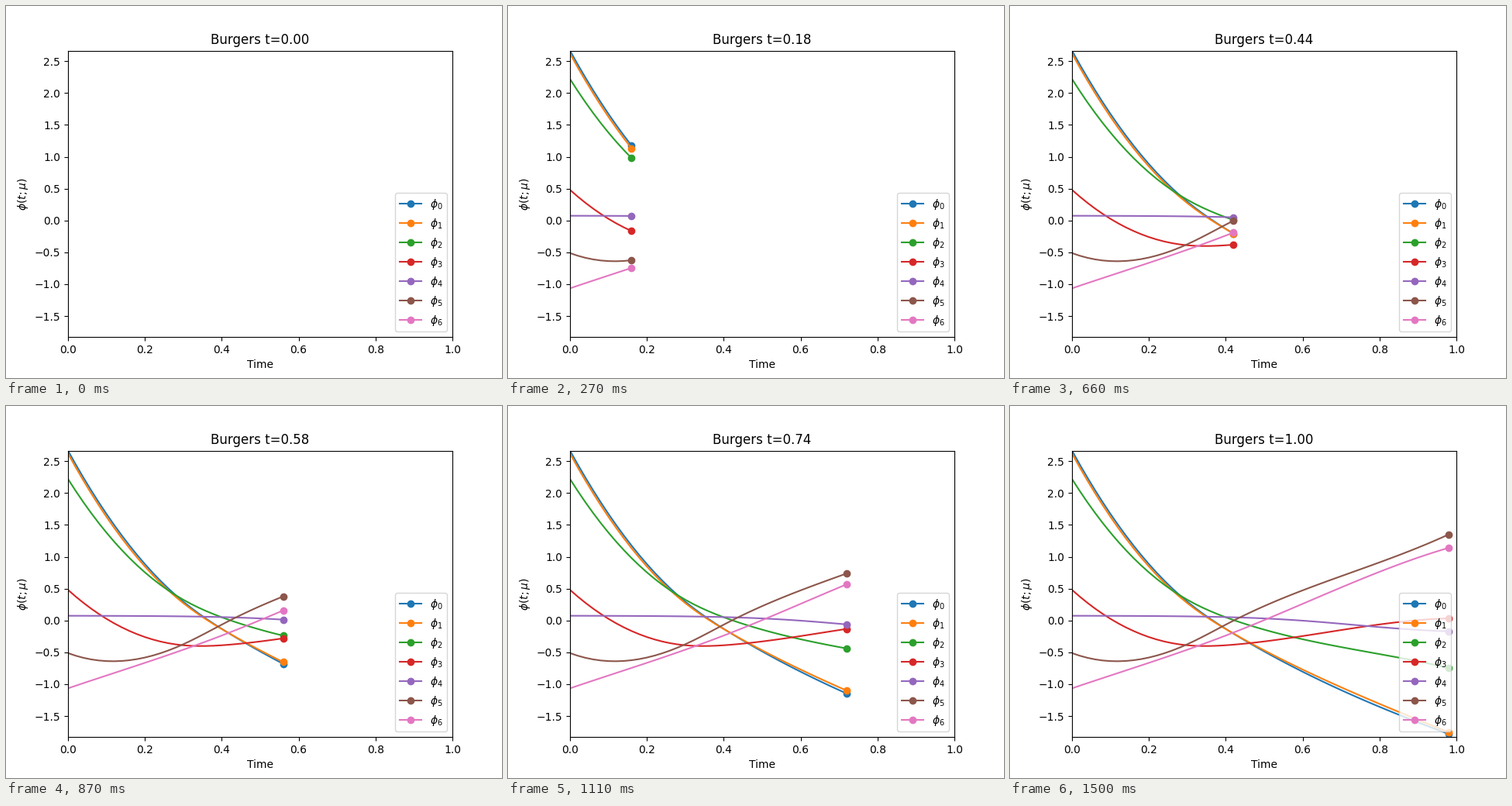
A matplotlib script that plays this animation: 640x480 px, repeating every 1.53 s.

```python
import numpy as np
import matplotlib.pyplot as plt
from matplotlib.animation import FuncAnimation

STEPS = 51
DT = 0.02
KNOTS = np.array([0, 0.16, 0.29, 0.42, 0.72, 0.98])
time = np.arange(STEPS) * DT


def basis(t):
    """Truncated power basis of a not-a-knot cubic spline."""
    powers = [t**k for k in range(4)]
    bends = [np.maximum(t - k, 0)**3 for k in KNOTS[2:-2]]
    return np.column_stack(powers + bends)


def spline(*values):
    return basis(time) @ np.linalg.solve(basis(KNOTS), values)


fall = spline(2.665, 1.176, 0.345, -0.206, -1.147, -1.782)
curves = [
    fall,
    fall - 0.047 * np.cos(4.4 * time - 0.255),
    spline(2.22, 0.98, 0.36, 0.007, -0.44, -0.745),
    spline(0.48, -0.165, -0.383, -0.38, -0.132, 0.033),
    0.075 - 0.285 / (1 + np.exp(7.5 * (0.73 - time))),
    spline(-0.512, -0.624, -0.40, -0.003, 0.738, 1.35),
    spline(-1.065, -0.745, -0.48, -0.19, 0.568, 1.14),
]

fig, ax = plt.subplots(figsize=(6.4, 4.8), dpi=100)
ax.set_xlim(0, 1)
ax.set_ylim(-1.83, 2.665)
ax.set_xlabel("Time")
ax.set_ylabel(r"$\phi(t;\mu)$")
title = ax.set_title("Burgers t=0.00")

# Only the newest point of each line carries a marker
lines = [
    ax.plot([], [], "-o", markevery=slice(-1, None), label=rf"$\phi_{i}$")[0]
    for i in range(len(curves))
]
ax.legend(loc="lower right")


def update(step):
    title.set_text(f"Burgers t={step * DT:.2f}")
    for line, curve in zip(lines, curves):
        line.set_data(time[:step], curve[:step])
    return [title, *lines]


anim = FuncAnimation(fig, update, frames=STEPS, interval=30,
                     repeat=True, repeat_delay=0)
plt.show()
```
